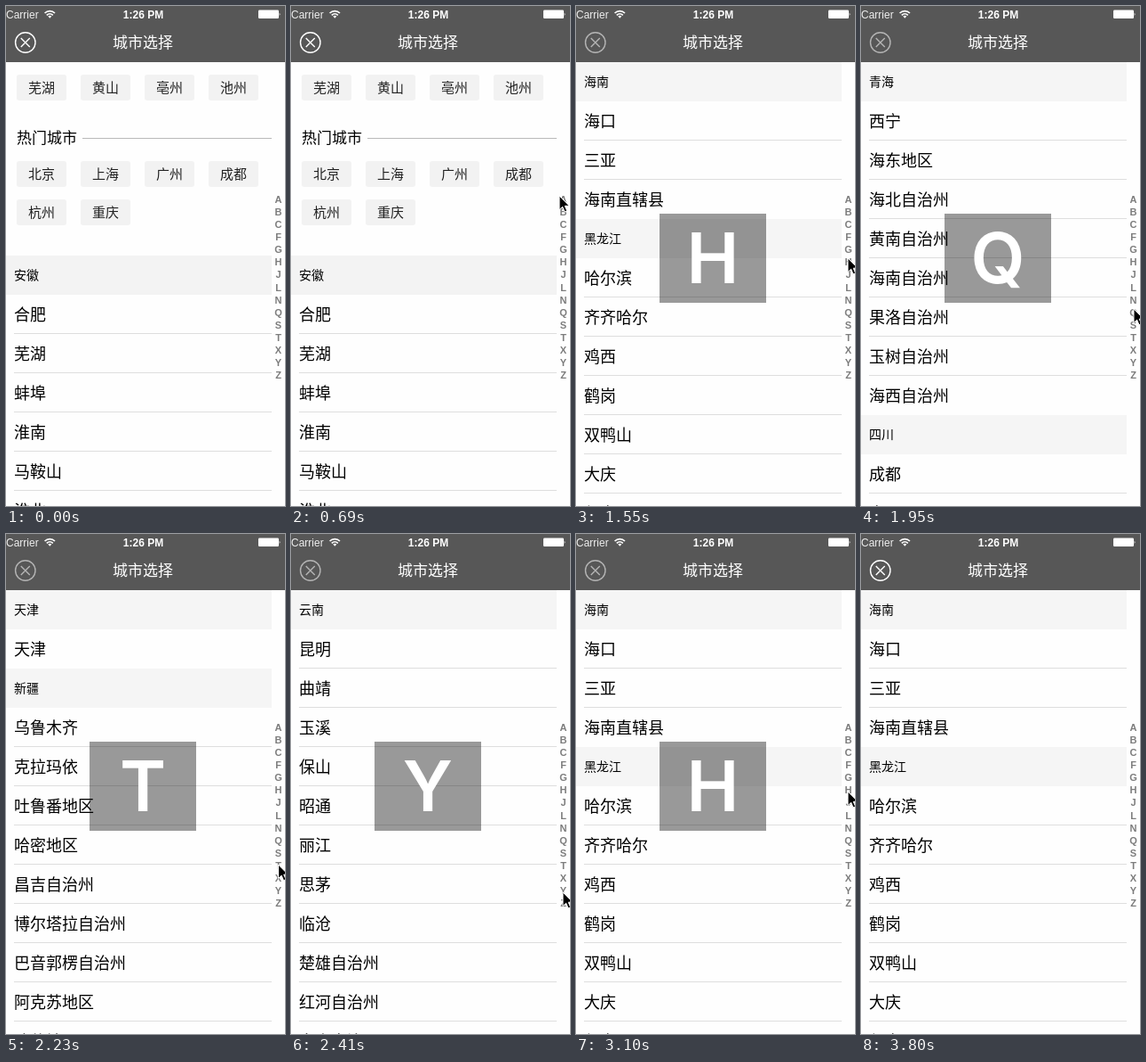
Recreate the animation shown at these times as an HTML page. Size 314 px wide and 561 px high, loop 4610 ms.

```html
<!DOCTYPE html>
<html lang="zh-CN">
<head>
<meta charset="utf-8">
<title>城市选择</title>
<style>
html, body { margin: 0; width: 100%; height: 100%; overflow: hidden; background: #fefefe; }
#stage { position: relative; width: 314px; height: 561px; overflow: hidden; background: #fefefe;
  color: #000; font-family: "Noto Sans CJK SC", "Noto Sans CJK", sans-serif; font-weight: 350; white-space: nowrap; }
#stage > * { position: absolute; }
.view { left: 0; width: 299px; }
.head, .row { box-sizing: border-box; height: 44px; line-height: 42px; padding-left: 9px; position: relative; }
.head { background: #f5f5f5; font-size: 14px; font-weight: 400; }
#home .head { background: #f3f3f3; }
.row { font-size: 18px; }
.row.line::after { content: ""; position: absolute; left: 9px; right: 0; bottom: 0; height: 1px; background: #dedede; }
.chip { position: absolute; width: 56px; height: 29px; line-height: 27px; border-radius: 3px;
  background: #f2f2f2; color: #222; font-size: 15px; text-align: center; }
.hot { position: absolute; left: 12px; top: 135px; font-size: 17px; line-height: 24px; }
.rule { position: absolute; left: 86px; top: 148px; width: 213px; height: 1px; background: #b9b9b9; }
#layer { left: 0; top: 0; }
.latin { font-family: "Liberation Sans", Arial, sans-serif; }
#big { font: 600 79px Inter, sans-serif; }
</style>
</head>
<body>
<div id="stage">
  <div id="home" class="view" style="top:0"></div>
  <div id="list" class="view" style="top:63px"></div>
  <svg id="layer" width="314" height="561" viewBox="0 0 314 561">
    <rect width="314" height="63" fill="#575757"/>
    <g class="latin" fill="#fff" font-size="12">
      <text x="0" y="13.5" fill="#eee">Carrier</text>
      <text x="154.5" y="13.5" font-weight="700" text-anchor="middle">1:26 PM</text>
    </g>
    <g fill="none" stroke="#fff" stroke-width="1.7">
      <path d="M43.6 8a8 8 0 0 1 11.4 0M45.8 10.3a5 5 0 0 1 7 0"/>
    </g>
    <path d="M49.3 13.7l-2-2.1a2.9 2.9 0 0 1 4 0z" fill="#fff"/>
    <rect x="284" y="4.5" width="23" height="9.5" rx="1.2" fill="#fff"/>
    <path d="M307.7 7.5q1.7 1.7 0 3.6z" fill="#fff"/>
    <text x="154" y="47.3" font-size="17" fill="#fff" text-anchor="middle">城市选择</text>
    <g id="close" fill="none" stroke="#fff" stroke-width="1.4">
      <circle cx="21.8" cy="41" r="11.2"/>
      <path d="M16.8 36l10 10m0-10l-10 10"/>
    </g>
    <g id="index" class="latin" fill="#7c7c7c" font-size="11" font-weight="700" text-anchor="middle"></g>
    <g id="hud">
      <rect x="94" y="233" width="120" height="100" fill="#000" fill-opacity=".4"/>
      <text id="big" x="154" y="311" fill="#fff" text-anchor="middle"></text>
    </g>
    <path id="cursor" d="M-1 -1V14.5L2.6 11.2L5 16.8L7.6 15.7L5.2 10.2H10.2Z" fill="#000" stroke="#fff" stroke-width="1"/>
  </svg>
</div>
<script>
const LOOP = 4610, TICK = 57.4, PRESS = 860, RELEASE = 3590, FADE = 190;
const LETTERS = 'ABCFGHJLNQSTXYZ', PITCH = 14.07;

// letter, province, cities
const DATA = `A 安徽 合肥 芜湖 蚌埠 淮南 马鞍山 淮北 铜陵 安庆 黄山 滁州 阜阳 宿州
B 北京 北京
C 重庆 重庆
F 福建 福州 厦门 莆田 三明 泉州 漳州 南平 龙岩 宁德
G 甘肃 兰州 嘉峪关 金昌 白银 天水 武威 张掖 平凉 酒泉 庆阳 定西 陇南
H 海南 海口 三亚 海南直辖县
H 黑龙江 哈尔滨 齐齐哈尔 鸡西 鹤岗 双鸭山 大庆 伊春 佳木斯 七台河
J 吉林 长春 吉林 四平 辽源 通化 白山 松原 白城 延边自治州
J 江苏 南京 无锡 徐州 常州 苏州
L 辽宁 沈阳 大连 鞍山 抚顺 本溪 丹东 锦州 营口 阜新 辽阳 盘锦 铁岭
N 内蒙古 呼和浩特 包头 乌海 赤峰 通辽 鄂尔多斯 呼伦贝尔 巴彦淖尔 乌兰察布 兴安盟 锡林郭勒盟
Q 青海 西宁 海东地区 海北自治州 黄南自治州 海南自治州 果洛自治州 玉树自治州 海西自治州
S 四川 成都 自贡 攀枝花 泸州 德阳 绵阳 广元 遂宁 内江 乐山 南充 眉山
T 天津 天津
X 新疆 乌鲁木齐 克拉玛依 吐鲁番地区 哈密地区 昌吉自治州 博尔塔拉自治州 巴音郭楞自治州 阿克苏地区 喀什地区 和田地区 伊犁自治州
Y 云南 昆明 曲靖 玉溪 保山 昭通 丽江 思茅 临沧 楚雄自治州 红河自治州 文山自治州 西双版纳自治州
Z 浙江 杭州 宁波 温州 嘉兴 湖州 绍兴 金华 衢州 舟山 台州 丽水`;

// pointer tip: time, x, y
const PATH = [
  [230, 316, 247], [290, 313, 244], [690, 303, 214], [860, 303, 214], [1148, 304, 236],
  [1550, 307, 284], [1952, 308, 341], [2411, 307, 403], [2470, 307, 410], [2530, 307, 408],
  [3100, 307, 290], [3510, 307, 286], [3600, 307, 286], [3780, 308, 560]
];

const $ = id => document.getElementById(id);
const clamp = v => Math.max(0, Math.min(1, v));

const items = [], start = {};
for (const line of DATA.split('\n')) {
  const [letter, head, ...cities] = line.split(' ');
  start[letter] ??= items.length;
  items.push(`<div class="head">${head}</div>`);
  cities.forEach((c, i) =>
    items.push(`<div class="row${i < cities.length - 1 ? ' line' : ''}">${c}</div>`));
}
const rowsFrom = letter => items.slice(start[letter], start[letter] + 12).join('');

const chips = (names, top) => names.split(' ').map((n, i) =>
  `<div class="chip" style="left:${12 + 72 * i}px;top:${top}px">${n}</div>`).join('');

$('home').innerHTML = chips('芜湖 黄山 亳州 池州', 77) +
  '<div class="hot">热门城市</div><div class="rule"></div>' +
  chips('北京 上海 广州 成都', 174) + chips('杭州 重庆', 217) +
  `<div class="view" style="position:absolute;top:280px">${rowsFrom('A')}</div>`;

$('index').innerHTML = [...LETTERS].map((c, i) =>
  `<text x="306.5" y="${(221 + PITCH * i).toFixed(1)}">${c}</text>`).join('');

function pointer(t) {
  const i = PATH.findIndex(p => p[0] > t);
  if (i < 1) return null;
  const [t0, x0, y0] = PATH[i - 1], [t1, x1, y1] = PATH[i];
  const k = (t - t0) / (t1 - t0);
  return [x0 + (x1 - x0) * k, y0 + (y1 - y0) * k];
}

let shown = '';
function render(time) {
  const t = Math.floor((time + 3) / TICK) * TICK;
  const pos = pointer(t);
  $('cursor').style.display = pos ? '' : 'none';
  if (pos) $('cursor').setAttribute('transform', `translate(${pos[0]} ${pos[1]})`);

  const active = t >= PRESS;
  $('home').style.display = active ? 'none' : '';
  $('list').style.display = active ? '' : 'none';

  const level = clamp((t - PRESS + TICK) / FADE) * clamp((RELEASE + FADE - t) / FADE);
  $('hud').style.opacity = active ? level : 0;
  $('close').style.opacity = active ? 1 - 0.45 * level : 1;

  if (active) {
    const y = pointer(Math.min(t, RELEASE))[1];
    const letter = LETTERS[Math.floor((y + 3 - 210) / PITCH)];
    if (letter !== shown) {
      shown = letter;
      $('list').innerHTML = rowsFrom(letter);
      $('big').textContent = letter;
    }
  }
}

const origin = performance.now();
function frame() {
  render((performance.now() - origin) % LOOP);
  requestAnimationFrame(frame);
}
frame();
</script>
</body>
</html>
```
